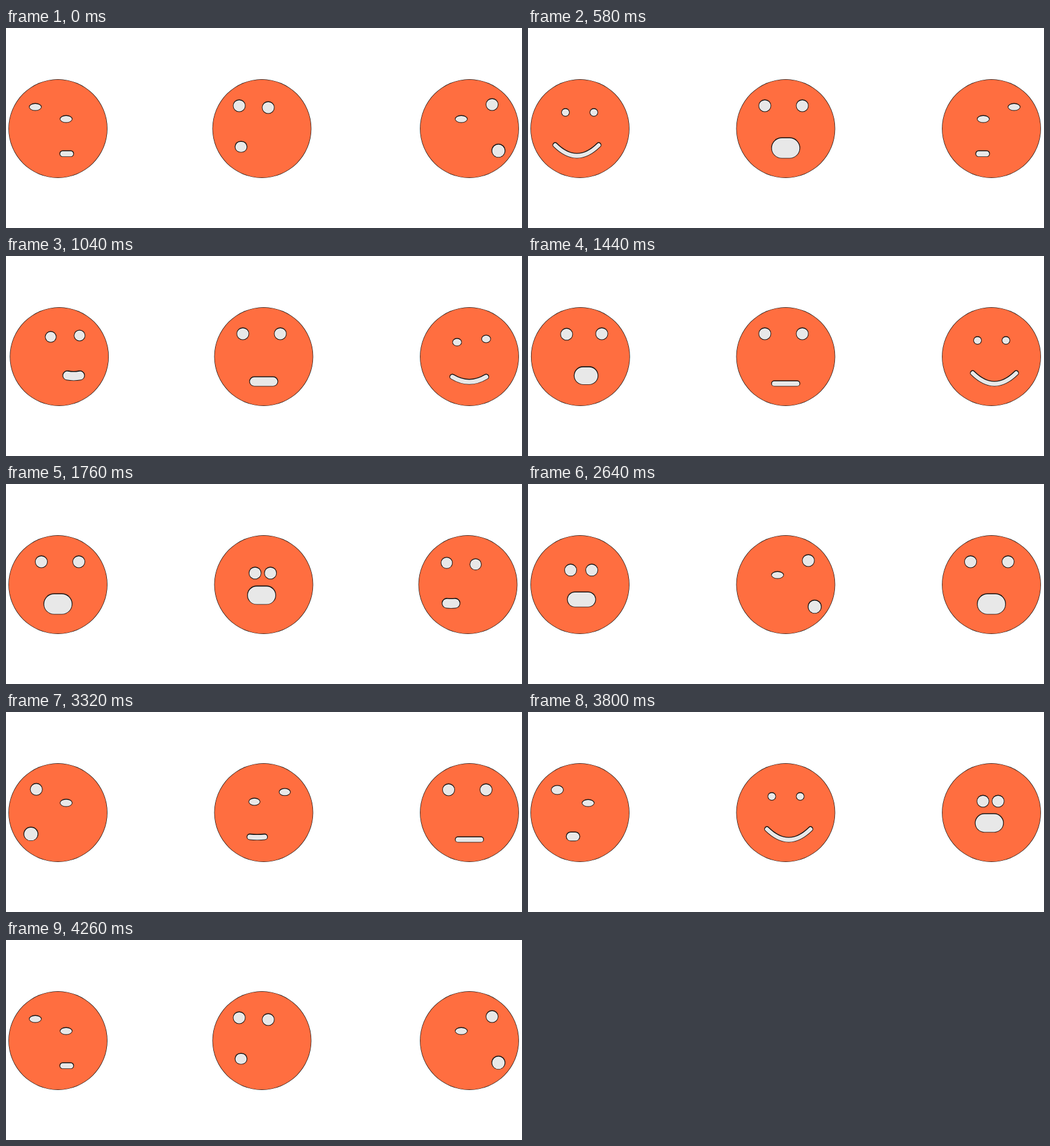
Animation of 854 by 332 pixels, one loop 4280 ms. Source, as an HTML page with a canvas:

```html
<!DOCTYPE html>
<html lang="en">
<head>
<meta charset="utf-8">
<title>Three changing faces</title>
<style>
  html, body { margin: 0; width: 100%; height: 100%; overflow: hidden; background: #fff; }
  canvas { display: block; }
</style>
</head>
<body>
<canvas id="stage" width="854" height="332"></canvas>
<script>
const ctx = document.getElementById('stage').getContext('2d');
const LOOP = 4280, FIRST = 280, PERIOD = 600, MOVE = 300;
const RADIUS = 81.5, OPEN = 20, SQUINT = 12;
const ORANGE = '#ff6e40', PALE = '#e8e8e8', INK = '#111';

// Eyes are placed by their midpoint, gap and tilt; a pose is a list that can be blended
const eyes = (x, y, gap, { tilt = 0, size = OPEN, left = size, right = size } = {}) => [
  x - gap / 2, y - tilt / 2, size, left,
  x + gap / 2, y + tilt / 2, size, right
];
const mouth = (x, y, w, h, smile = 0) => [x, y, w, h, smile];
const pose = (eyes, mouth, shift = 0) => [...eyes, ...mouth, shift];

const stare = eyes(-3.5, -38, 62);
const POSES = [
  pose(eyes(-16.5, -36.5, 48, { tilt: 3 }), mouth(-37.5, 30, 20, 18), -3),
  pose(stare, mouth(0, 32, 47, 34)),
  pose(stare, mouth(0, 44.5, 47, 9)),
  pose(eyes(-1.5, -19, 25), mouth(-3.5, 17, 47, 31)),
  pose(eyes(12, -28, 51, { tilt: -24, left: SQUINT }), mouth(48, 36.5, 22, 22)),
  pose(eyes(12, -26, 51, { tilt: -20, left: SQUINT, right: SQUINT }), mouth(-14.5, 41.5, 23, 10)),
  pose(eyes(0.5, -27, 47, { size: 13 }), mouth(5, 36, 80, 8, 1))
];

// All faces share one cycle; after two moves together each keeps its own lag
const FACES = [
  { x: 86, flip: -1, first: 5, lag: -200 },
  { x: 426.5, flip: 1, first: 0, lag: 5 },
  { x: 767, flip: 1, first: 4, lag: 85 }
];

const easeOut = p => 1 - (1 - p) ** 1.7;
const clamp = p => Math.min(1, Math.max(0, p));

function poseAt({ first, lag }, time) {
  let progress = 0;
  for (let i = 0; i < POSES.length; i++) {
    const start = FIRST + i * PERIOD + (i > 1 ? lag : 0);
    progress += easeOut(clamp((time - start) / MOVE));
  }
  const step = Math.floor(progress);
  const from = POSES[(first + step) % POSES.length];
  const to = POSES[(first + step + 1) % POSES.length];
  return from.map((v, i) => v + (to[i] - v) * (progress - step));
}

function ellipse(x, y, w, h, fill) {
  ctx.beginPath();
  ctx.ellipse(x, y, w / 2, h / 2, 0, 0, Math.PI * 2);
  ctx.fillStyle = fill;
  ctx.fill();
}

function drawEye(x, y, w, h) {
  ellipse(x, y, w + 1, h + 1, INK);
  ellipse(x, y + 0.2, w - 1, h - 1.4, PALE);
}

function drawMouth(x, y, w, h, smile) {
  const half = Math.max(0.01, (w - h) / 2);
  const bend = smile * w * w / 180;
  const line = (dy, width, color) => {
    const end = y + dy - bend / 4;
    ctx.beginPath();
    ctx.moveTo(x - half, end);
    ctx.quadraticCurveTo(x, end + bend, x + half, end);
    ctx.lineWidth = width;
    ctx.strokeStyle = color;
    ctx.stroke();
  };
  line(0, h + 1, INK);
  line(0.4, h - 1.4, PALE);
}

function drawFace(face, time) {
  const parts = poseAt(face, time);
  const shift = parts.pop();
  ctx.save();
  ctx.translate(face.x, 167);
  ctx.scale(face.flip, 1);
  ellipse(shift, 0, 2 * RADIUS + 0.8, 2 * RADIUS + 0.8, INK);
  ellipse(shift, 0, 2 * RADIUS - 0.6, 2 * RADIUS - 0.6, ORANGE);
  drawEye(...parts.slice(0, 4));
  drawEye(...parts.slice(4, 8));
  drawMouth(...parts.slice(8));
  ctx.restore();
}

ctx.lineCap = 'round';

function frame() {
  const time = performance.now() % LOOP;
  ctx.fillStyle = '#fff';
  ctx.fillRect(0, 0, 854, 332);
  FACES.forEach(face => drawFace(face, time));
  requestAnimationFrame(frame);
}
frame();
</script>
</body>
</html>
```
